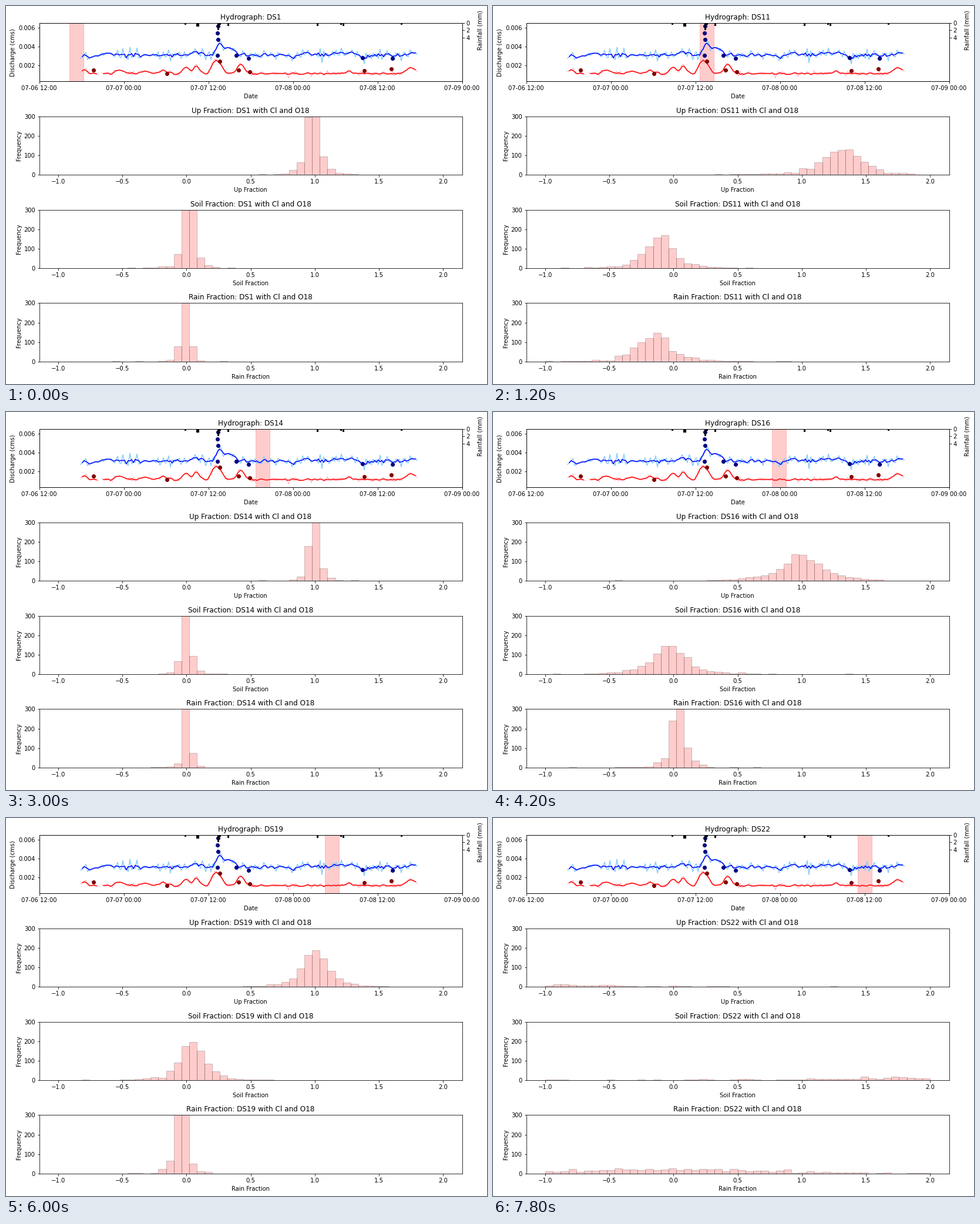
Write a matplotlib script that moves like this. It is 819 by 643 pixels and loops after 8000 ms.

```python
import numpy as np
import matplotlib.pyplot as plt
from matplotlib.animation import FuncAnimation

W, H, DPI = 819, 643, 72
LEFT, WIDTH, HEIGHT = 56.55, 720, 99.45
BOTTOM, PITCH = 128.48, 158.8
BINS, STEP = 50, 0.06
STEP_MS, TICK_MS, LOOP_MS = 600, 200, 8000
SAMPLES = 900

rng = np.random.default_rng(18)
plt.rcParams["font.family"] = "DejaVu Sans"
fig = plt.figure(figsize=(W / DPI, H / DPI), dpi=DPI, facecolor="white")


def panel(row):
    low = BOTTOM + row * PITCH
    return fig.add_axes([LEFT / W, 1 - low / H, WIDTH / W, HEIGHT / H])


# ---- histogram data -------------------------------------------------------

# station: band centre, then (middle, width) of the up, soil and rain peaks
KEYS = {
    1: (120.4, 0.986, 0.06, 0.02, 0.054, -0.01, 0.028),
    11: (364.3, 1.33, 0.2, -0.106, 0.15, -0.15, 0.18),
    14: (437.3, 0.998, 0.036, -0.004, 0.031, 0.002, 0.02),
    16: (487.3, 0.998, 0.216, -0.034, 0.18, 0.038, 0.054),
    17: (507.3, 0.59, 1.2, 0.56, 0.84, -0.34, 0.42),
    19: (555.3, 0.998, 0.14, 0.044, 0.13, -0.04, 0.05),
    22: (633.3, -1.87, 1.2, 2.75, 1.2, -0.1, 1.2),
}
edges = -1 + STEP * np.arange(BINS)


def histogram(middle, width):
    """Random counts from a heavy-tailed peak of fixed total size."""
    d = (edges + STEP / 2 - middle) / width
    top = SAMPLES * STEP / (2 * width)
    return rng.poisson(top / (1 + d ** 2) ** 1.5)


def station(number):
    """Stations without a key lie between their neighbours."""
    columns = zip(*KEYS.values())
    centre, *peaks = [np.interp(number, list(KEYS), c) for c in columns]
    counts = [histogram(*peaks[k:k + 2]) for k in (0, 2, 4)]
    return f"DS{number}", centre, counts


stations = [station(n) for n in (1, *range(10, 23))]

# ---- hydrograph, laid out in stage pixels ---------------------------------

flow = panel(0)
flow.set_xlim(LEFT, LEFT + WIDTH)
flow.set_ylim(BOTTOM, BOTTOM - HEIGHT)
flow.set_xticks(LEFT + 144 * np.arange(6),
                [f"07-{6 + h // 24:02d} {h % 24:02d}:00"
                 for h in range(12, 73, 12)])
flow.set_yticks([36.9, 69.1, 101.3], ["0.006", "0.004", "0.002"])
flow.set_xlabel("Date")
flow.set_ylabel("Discharge (cms)")

x = np.arange(127, 702, 3.0)


def trace(base, bumps, noise, colors, gap=None):
    """Noisy reading of some flow peaks, and its three-point rolling mean."""
    y = base - sum(rise * np.exp(-((x - at) / width) ** 2)
                   for at, width, rise in bumps)
    y += np.diff(rng.normal(0, noise, x.size + 1))
    y[x == gap] = np.nan
    flow.plot(x, y, color=colors[0])
    flow.plot(x[1:-1], np.convolve(y, np.ones(3) / 3, "valid"),
              color=colors[1])


trace(83.5, [(148, 8, -5), (173, 10, 4), (323, 7, 8), (363, 6, 17),
             (378, 14, 13), (488, 10, -3), (508, 6, 6), (575, 25, 4),
             (612, 10, -5), (690, 8, 3)],
      3.7, ("lightskyblue", "blue"))
trace(115, [(133, 6, 7), (193, 10, 6), (235, 10, 4), (268, 7, 7),
            (306, 6, 13), (324, 6, 15), (357, 8, 24), (367, 5, 10),
            (400, 8, 17), (583, 8, 4), (690, 10, 11)],
      1.5, ("pink", "red"), gap=160)


def dots(color, points):
    flow.plot(*zip(*points), "o", color=color, ms=6)


dots("navy", [(361, 33.5), (360, 46), (360.5, 56.5), (359.5, 83.5),
              (391.5, 83.5), (412.5, 88.5), (606.5, 87.5), (657.5, 88.5)])
dots("maroon", [(148.5, 108.5), (273.5, 114.5), (363.5, 93.5),
                (395.5, 108.5), (414.5, 111.5), (609.5, 109.5),
                (655.5, 106.5)])
band = flow.axvspan(0, 24, color="red", alpha=0.2)

rain = flow.twinx()
rain.set_ylim(16, 0)
rain.set_yticks([0, 2, 4])
for at, depth in [(304, 0.45), (324, 0.9), (326, 0.9), (360, 1.9),
                  (363, 0.5), (377, 0.8), (529, 0.8), (569, 0.4),
                  (573, 0.8), (672, 0.4)]:
    rain.bar(at, depth, 3, align="edge", color="black")
rain.set_xlim(LEFT, LEFT + WIDTH)
fig.text(807 / W, 1 - 41 / H, "Rainfall (mm)", rotation=90,
         ha="center", va="center")

# ---- histogram panels -----------------------------------------------------

kinds = ("Up", "Soil", "Rain")
panels = []
for row, kind in enumerate(kinds, 1):
    ax = panel(row)
    bars = ax.bar(edges, np.zeros(BINS), STEP, align="edge", color="red",
                  edgecolor="black", linewidth=1, alpha=0.2)
    ax.set_xlim(-1.15, 2.15)
    ax.set_ylim(0, 300)
    ax.set_xticks(np.arange(-1, 2.1, 0.5))
    ax.set_yticks([0, 100, 200, 300])
    ax.set_xlabel(f"{kind} Fraction")
    ax.set_ylabel("Frequency")
    panels.append((ax, bars))


def draw(i):
    name, centre, data = stations[i * TICK_MS // STEP_MS]
    flow.set_title(f"Hydrograph: {name}")
    band.set_x(centre - 12)
    for kind, (ax, bars), counts in zip(kinds, panels, data):
        ax.set_title(f"{kind} Fraction: {name} with Cl and O18")
        for bar, count in zip(bars, counts):
            bar.set_height(count)


anim = FuncAnimation(fig, draw, frames=LOOP_MS // TICK_MS, interval=TICK_MS,
                     init_func=lambda: draw(0), repeat=True, repeat_delay=0)
plt.show()
```
